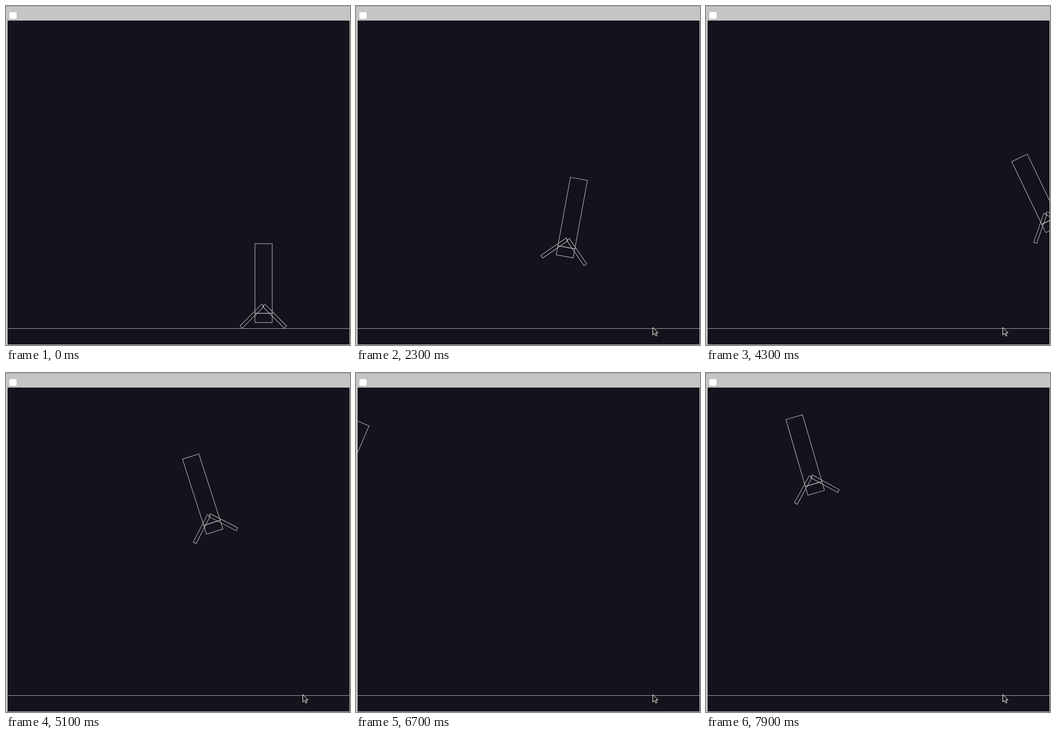
Animation of 638 by 628 pixels, one loop 8000 ms. Source, as an HTML page:

```html
<!DOCTYPE html>
<html lang="en">
<head>
<meta charset="utf-8">
<title>Lander</title>
<style>
  html, body { margin: 0; width: 100%; height: 100%; overflow: hidden; background: #c5c5c5; }
  svg { display: block; }
</style>
</head>
<body>
<svg width="638" height="628" viewBox="0 0 638 628">
  <defs>
    <clipPath id="view"><rect x="3" y="27" width="634" height="600"/></clipPath>
    <rect id="leg" width="57" height="6"/>
  </defs>
  <rect width="638" height="628" fill="#c5c5c5"/>
  <rect width="638" height="1" fill="#9c9c9c"/>
  <rect x="5.5" y="10.5" width="15" height="14" rx="3.5" fill="#fff" stroke="#b4b4b4"/>
  <rect x="3" y="27" width="634" height="600" fill="#13131c"/>
  <g clip-path="url(#view)" fill="none" stroke="#bcbcc0">
    <path d="M3 597.5H637" stroke="#9b9b9f"/>
    <g id="ship">
      <rect x="-16" y="-64.5" width="32" height="129"/>
      <rect x="-16" y="64.5" width="32" height="17"/>
      <g transform="translate(-.6 51.8)">
        <use href="#leg" transform="translate(1.3 0) rotate(135)"/>
        <use href="#leg" transform="translate(-1.3 0) scale(-1 1) rotate(135)"/>
      </g>
    </g>
  </g>
  <path id="cursor" d="M.5 .5V14.5L3.7 11.6 6 16.6 8.2 15.6 6 10.7H10.3Z" fill="#111" stroke="#fff"/>
</svg>
<script>
const LOOP = 8000, START = 500, STEP = 200;

// Key points of the flight: time, centre x, centre y, tilt in degrees
const flight = [
  [1100, 477.8, 504.8, 0],
  [1700, 465, 471, -15],
  [2300, 401.8, 383.6, 10.4],
  [2700, 391, 320, 35.6],
  [3100, 464.3, 272.8, 13.8],
  [3900, 606, 253, -36],
  [4300, 609.3, 339.4, -25.6],
  [5100, 362.2, 216.2, -17.8],
  [5700, 138.7, 99.2, 11],
  [6300, -6, 158, 35],
  [6700, -16, 151, 23.3],
  [7300, 100, 76, -9],
  [7700, 183, 160.4, -29],
  [7900, 181.6, 143.7, -16.2]
];

const ship = document.getElementById("ship");
const cursor = document.getElementById("cursor");

// The ship starts at rest
function slope(i, c) {
  if (i === 0) return 0;
  const a = flight[i - 1], b = flight[i + 1] || flight[i];
  return (b[c] - a[c]) / (b[0] - a[0]);
}

// Smooth Hermite curve through the key points
function pose(time) {
  const t = Math.max(time, flight[0][0]);
  const next = flight.findIndex(p => p[0] >= t);
  const i = Math.max(next - 1, 0);
  const a = flight[i], b = flight[i + 1];
  const d = b[0] - a[0], u = (t - a[0]) / d, v = 1 - u;
  return [1, 2, 3].map(c =>
    v * v * (1 + 2 * u) * a[c] + u * u * (1 + 2 * v) * b[c] +
    d * u * v * (v * slope(i, c) - u * slope(i + 1, c)));
}

function draw(time) {
  const t = time < START ? 0 : START + Math.floor((time - START) / STEP) * STEP;
  const [x, y, tilt] = pose(t);
  ship.setAttribute("transform", `translate(${x} ${y}) rotate(${tilt})`);
  const cursorX = t < 700 ? 522 : t < 1100 ? 535 : 550;
  cursor.setAttribute("transform", `translate(${cursorX} 595)`);
  cursor.setAttribute("visibility", t < START ? "hidden" : "visible");
}

const begin = performance.now();
function tick() {
  draw((performance.now() - begin) % LOOP);
  requestAnimationFrame(tick);
}
tick();
</script>
</body>
</html>
```
